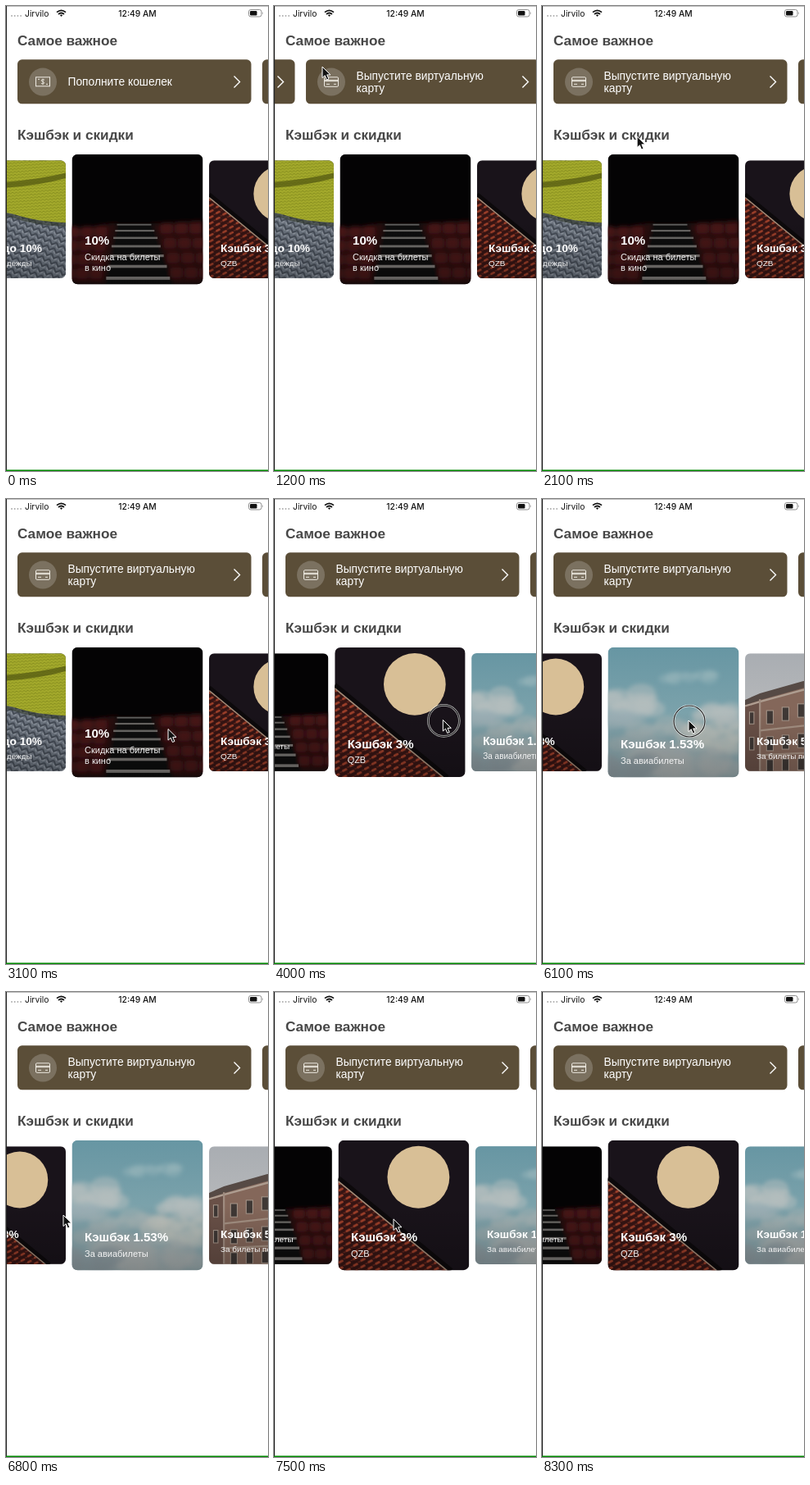
These frames come from a looping animation (320 by 567 pixels, 8.6 s). An HTML page:

```html
<!DOCTYPE html>
<html lang="ru">
<head>
<meta charset="utf-8">
<title>Кэшбэк и скидки</title>
<style>
  html, body { margin: 0; width: 100%; height: 100%; overflow: hidden; background: #fff; }
  svg { display: block; width: 100%; height: 100%; }
  text { font-family: "Liberation Sans", Arial, sans-serif; }
  .status { font: 500 10.3px Inter, sans-serif; fill: #111; }
  .head { font-size: 17.2px; font-weight: 700; fill: #474747; }
  .label { font-size: 13.8px; fill: #fff; }
  .title { font-size: 15.1px; font-weight: 700; fill: #fff; }
  .sub { font-size: 11px; fill: #f4f4f4; }
</style>
</head>
<body>
<svg viewBox="0 0 320 567" preserveAspectRatio="none">
  <defs>
    <clipPath id="card"><rect width="160" height="158.5" rx="7"/></clipPath>
    <linearGradient id="shade" x2="0" y2="1">
      <stop offset=".5" stop-opacity="0"/><stop offset="1" stop-opacity=".22"/>
    </linearGradient>
    <linearGradient id="sky" x2="0" y2="1">
      <stop stop-color="#6796a3"/><stop offset=".5" stop-color="#7ba2ab"/><stop offset="1" stop-color="#8fa5aa"/>
    </linearGradient>
    <linearGradient id="haze" x2="0" y2="1">
      <stop stop-color="#a9adb2"/><stop offset="1" stop-color="#c4c4c3"/>
    </linearGradient>
    <pattern id="fine" width="5" height="4" patternUnits="userSpaceOnUse" patternTransform="rotate(-4)">
      <path d="M0 1L2.5 3L5 1" fill="none" stroke="#6f7612" stroke-opacity=".65"/>
    </pattern>
    <pattern id="chunky" width="10" height="8" patternUnits="userSpaceOnUse" patternTransform="rotate(24)">
      <path d="M0 1L5 6L10 1" fill="none" stroke="#434a54" stroke-width="2"/>
      <path d="M1 5L5 9M9 5L5 9" stroke="#99a0a9" stroke-width="1.2"/>
    </pattern>
    <pattern id="dash" width="9" height="8" patternUnits="userSpaceOnUse" patternTransform="skewY(12)">
      <path d="M1 5L5 2" stroke="#a0402a" stroke-width="2.6" stroke-linecap="round"/>
      <path d="M6 8L9 6" stroke="#6d2a1e" stroke-width="1.4"/>
    </pattern>
    <filter id="soft" x="-20%" y="-20%" width="140%" height="140%"><feGaussianBlur stdDeviation="2.4"/></filter>
  </defs>
  <rect width="320" height="567" fill="#fff"/>
  <g fill="#a8a8a8" id="signal"></g>
  <text class="status" x="23" y="12.6" style="font-weight:400">Jirvilo</text>
  <g fill="none" stroke="#111" stroke-width="1.7">
    <path d="M62 7.7Q67.5 2.9 73 7.7M64 10Q67.5 7 71 10"/>
    <path d="M65.8 11.1L67.5 13L69.2 11.1Q67.5 9.8 65.8 11.1Z" fill="#111" stroke="none"/>
  </g>
  <text class="status" x="160.5" y="12.6" text-anchor="middle">12:49 AM</text>
  <rect x="296.5" y="4.5" width="15.5" height="8.5" rx="2.4" fill="none" stroke="#8c8c8c"/>
  <rect x="298" y="6" width="8.5" height="5.5" rx="1.2" fill="#111"/>
  <path d="M313.3 7.2Q315 8.7 313.3 10.3Z" fill="#8c8c8c"/>
  <text class="head" x="14" y="48">Самое важное</text>
  <g id="banners"></g>
  <text class="head" x="14" y="163">Кэшбэк и скидки</text>
  <g id="cards"></g>
  <path d="M0 .3H320" stroke="#777" stroke-width=".6"/>
  <rect width="1" height="567" fill="#222"/>
  <rect y="565.5" width="320" height="1.5" fill="#080"/>
  <g id="cursor">
    <g id="ring" fill="none"><circle cx="1" cy="1" r="19" stroke="#fff" stroke-opacity=".7" stroke-width="2.6"/><circle cx="1" cy="1" r="19" stroke="#222" stroke-width="1.2"/></g>
    <path d="M0 0V13.6L3.2 10.7L5.4 16L7.9 15L5.7 9.9H10Z" fill="#111" stroke="#fff" stroke-width="1"/>
  </g>
</svg>
<script>
const $ = id => document.getElementById(id);
const times = (n, f) => Array.from({ length: n }, (_, i) => f(i)).join('');
const clamp = v => Math.max(0, Math.min(1, v));
const smooth = v => v * v * (3 - 2 * v);
let seed = 7;
const rnd = () => (seed = seed * 16807 % 2147483647) / 2147483647;
const LOOP = 8600, STEP = 100, PITCH = 299;

$('signal').innerHTML = times(4, i => `<circle cx="${7 + i * 3.7}" cy="12" r=".9"/>`);

// Banner carousel
const note = `<rect x="22.5" y="21.5" width="17" height="11"/>
  <path d="M25 24h2M35 30h2"/><path d="M33 24.8Q29 23.6 29.2 25.8Q31 27 32.6 28Q33 30.2 29 29.2M31 23.4V30.8" stroke-width=".9"/>`;
const plastic = `<rect x="22.5" y="21.5" width="17" height="11.5" rx="1.2"/>
  <path d="M22.5 25H39.5M22.5 26.3H39.5M25 30H29M34 30h3"/>`;
const banner = (i, icon, lines) => `<g transform="translate(${14 + i * PITCH} 65.3)">
  <rect width="285.5" height="54" rx="5.5" fill="#5b4e38"/>
  <circle cx="31" cy="27.3" r="17" fill="#7b7160"/>
  <g fill="none" stroke="#eeeae2">${icon}</g>
  <path d="M264.5 20.3L271.5 27.2L264.5 34.1" fill="none" stroke="#fff" stroke-width="1.4"/>
  ${lines.map((s, k) => `<text class="label" x="61.5" y="${31.8 - (lines.length - 1) * 7.3 + k * 15.2}">${s}</text>`).join('')}
</g>`;
$('banners').innerHTML =
  banner(0, note, ['Пополните кошелек']) +
  banner(1, plastic, ['Выпустите виртуальную', 'карту']) +
  banner(2, note, []);

// Card pictures, drawn in a 160 x 158.5 box
const box = fill => `<rect width="160" height="159" fill="${fill}"/>`;
const knit = () => {
  const top = 'M0 0H160V84Q120 82 95 74T0 66Z';
  return box('#6c747f') + box('url(#chunky)') +
    `<path d="${top}" fill="#a4aa2c"/><path d="${top}" fill="url(#fine)"/>
    <path d="M0 30Q90 34 160 17V24Q95 42 0 37Z" fill="#545a12" opacity=".75"/>
    <path d="M0 66Q70 66 95 74T160 84V89Q120 88 95 79T0 71Z" fill="#30362b" opacity=".6"/>`;
};
const seat = (x, y) => `<rect x="${x}" y="${y}" width="15" height="13" rx="4" fill="#471419"/>`;
const cinema = () => box('#040304') + '<g filter="url(#soft)">' +
  '<path d="M0 92L48 84H110L160 80V159H0Z" fill="#26090d"/>' +
  times(4, r => times(3, c => seat(c * 17 - 6 - r * 2, 88 + r * 17) + seat(108 + r * 4 + c * 18, 84 + r * 18))) +
  '<path d="M55 84H98L124 159H40Z" fill="#0d0b0c"/></g>' +
  times(7, i => `<rect x="${55 - i * 2.2}" y="${85 + 6.5 * i + .7 * i * i}" width="${42 + i * 6}" height="${1.8 + i * .35}" fill="#9c9894" opacity="${.6 + i * .03}"/>`);
const poster = () => box('#19131a') +
  '<circle cx="98" cy="45" r="38" fill="#d8bf96"/>' +
  '<path d="M0 47L137 159H0Z" fill="#351413"/><path d="M0 51L132 159H0Z" fill="url(#dash)"/>' +
  '<path d="M0 46L138 159" stroke="#0c090b" stroke-width="6"/><path d="M0 50L133 159" stroke="#a48c78" stroke-width="1.6"/>';
const cloud = (x, y, w, h, fill) => times(14, () => {
  const r = 4 + rnd() * h * .5;
  return `<ellipse cx="${x + (rnd() - .5) * w}" cy="${y + (rnd() - .5) * h}" rx="${r * 1.5}" ry="${r}" fill="${fill}" opacity=".5"/>`;
});
const clouds = () => box('url(#sky)') + '<g filter="url(#soft)">' +
  cloud(28, 66, 64, 22, '#b3bebd') + cloud(20, 86, 50, 14, '#9cb0b5') + cloud(100, 36, 60, 6, '#92b1b8') +
  cloud(128, 84, 56, 16, '#b2bcbb') + cloud(75, 98, 80, 14, '#a3b3b6') + cloud(134, 112, 60, 26, '#bec1bc') +
  cloud(50, 124, 90, 22, '#a3b0b2') + cloud(105, 146, 120, 24, '#a9b0af') + cloud(20, 148, 60, 18, '#8d9ca1') + '</g>';
const pane = (x, y, w, h) => `<rect x="${x}" y="${y}" width="${w}" height="${h}" fill="#3f3835" stroke="#a39387" stroke-width="1.2"/>`;
const house = () => box('url(#haze)') +
  `<path d="M0 68L20 62V159H0Z" fill="#6a5148"/>
  <path d="M20 62L160 24V159H20Z" fill="#84675a"/>
  <path d="M-1 63L20 54L160 14V24L20 63L-1 70Z" fill="#564a45"/>
  <path d="M0 71L20 65L160 27" fill="none" stroke="#ae9d90" stroke-width="2.5"/>
  <path d="M20 104L160 88M20 137L160 130" stroke="#a59183" stroke-width="2.5"/>
  <path d="M20 62V159" stroke="#a08c80" stroke-width="2.5"/>` +
  times(6, c => pane(29 + c * 21, 77 - c * 4.5, 9, 18) + pane(29 + c * 21, 112 - c * 2, 9, 19) + pane(29 + c * 21, 143 - c, 9, 16)) +
  pane(6, 79, 6, 16) + pane(6, 113, 6, 17);

const deals = [
  [knit, 'Кэшбэк до 10%', 'На покупку одежды'],
  [cinema, '10%', 'Скидка на билеты', 'в кино'],
  [poster, 'Кэшбэк 3%', 'QZB'],
  [clouds, 'Кэшбэк 1.53%', 'За авиабилеты'],
  [house, 'Кэшбэк 5%', 'За билеты поездом'],
];
$('cards').innerHTML = deals.map(([art, title, ...subs]) => {
  const lift = (subs.length - 1) * 13;
  return `<g><g clip-path="url(#card)">${art()}${box('url(#shade)')}</g>
    <text class="title" x="15.5" y="${123.7 - lift}">${title}</text>
    ${subs.map((s, k) => `<text class="sub" x="15.5" y="${142 - lift + k * 13}">${s}</text>`).join('')}</g>`;
}).join('');
const cards = [...$('cards').children];

// A drag covers part of a page, then the rest settles exponentially
const swipe = (t, from, to, part) => t < to
  ? part * smooth(clamp((t - from) / (to - from)))
  : 1 - (1 - part) * Math.exp(-.01 * (t - to));

const path = [
  [100, 230, 538], [600, 288, 92], [700, 288, 92], [1100, 60, 74], [1200, 59, 74], [1400, 60, 76],
  [3000, 198, 280], [3200, 198, 281], [3500, 102, 274], [3900, 225, 270], [4250, 131, 267],
  [4800, 131, 267], [5900, 179, 270], [6200, 179, 270], [6800, 70, 272], [7130, 146, 274],
  [7700, 146, 278], [8200, 152, 494],
];
const presses = [[700, 1100], [3150, 3500], [3950, 4250], [6000, 6200], [6850, 7130]];

function pointer(t) {
  const n = path.findIndex(p => p[0] > t);
  if (n < 0) return path[path.length - 1].slice(1);
  const a = path[Math.max(0, n - 1)], b = path[n];
  const k = smooth(clamp((t - a[0]) / (b[0] - a[0])));
  return [a[1] + (b[1] - a[1]) * k, a[2] + (b[2] - a[2]) * k];
}

function draw(t) {
  $('banners').setAttribute('transform', `translate(${-PITCH * swipe(t, 700, 1100, .773)} 0)`);

  const page = 1 + swipe(t, 3200, 3500, .6) + swipe(t, 3950, 4250, .59) - swipe(t, 6850, 7130, .475);
  cards.forEach((card, i) => {
    const d = i - page, s = 1 - .094 * Math.min(1, Math.abs(d));
    card.style.display = Math.abs(d) < 1.6 ? '' : 'none';
    card.setAttribute('transform', `translate(${160.5 + 160 * d} 260) scale(${s}) translate(-80 -79.25)`);
  });

  $('cursor').style.display = t >= 100 && t < 8300 ? '' : 'none';
  $('cursor').setAttribute('transform', `translate(${pointer(t)})`);
  $('ring').style.display = presses.some(([a, b]) => t >= a && t <= b) ? '' : 'none';
}

const start = performance.now();
function tick() {
  const t = (performance.now() - start) % LOOP;
  draw(Math.min(8300, Math.floor(t / STEP) * STEP));
  requestAnimationFrame(tick);
}
tick();
</script>
</body>
</html>
```
